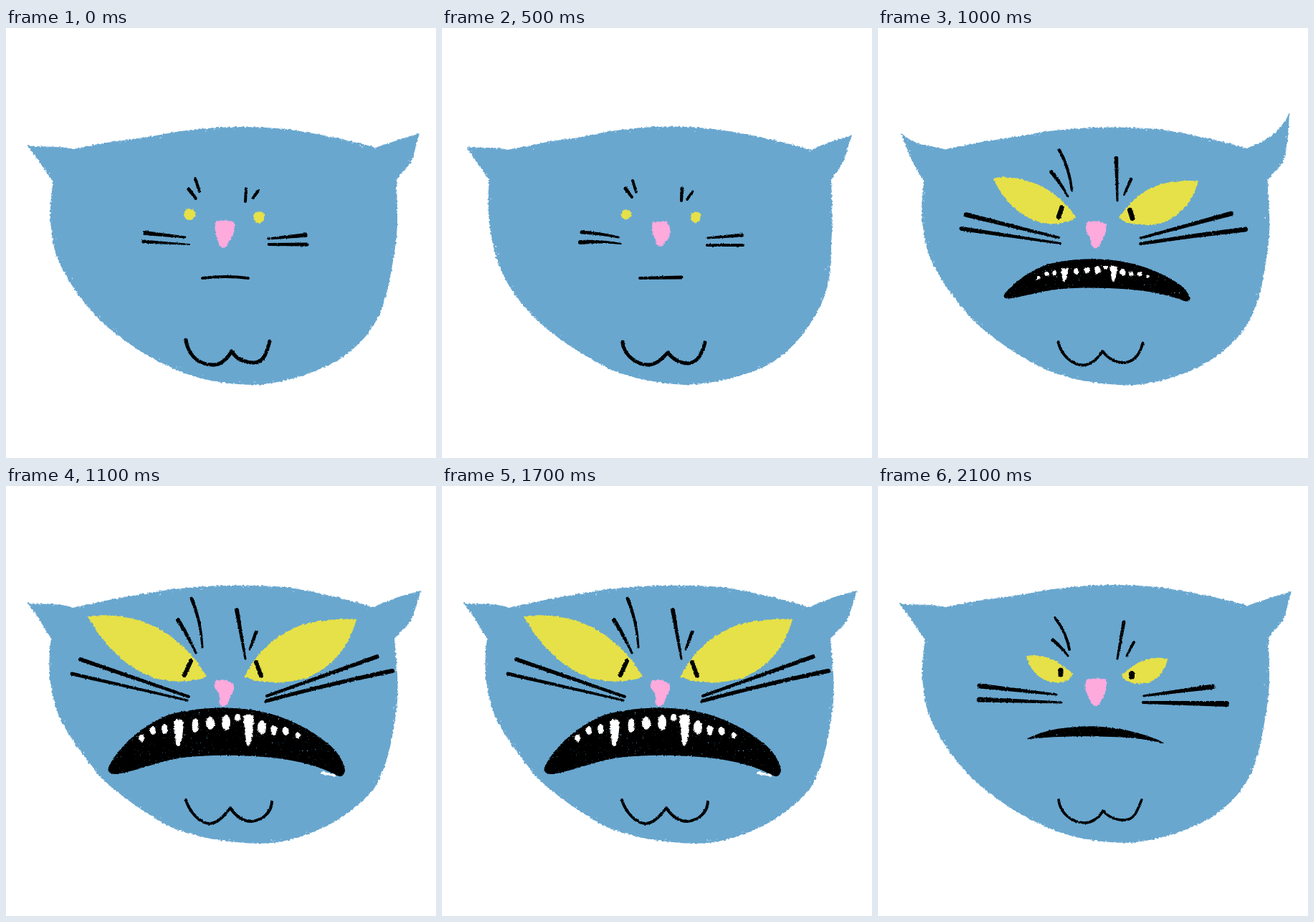
Write an HTML page that moves like this. It is 600 px wide and 600 px high and loops after 2200 ms.

```html
<!DOCTYPE html>
<html lang="en">
<head>
<meta charset="utf-8">
<title>Grumpy cat</title>
<style>
  html, body { margin: 0; width: 100%; height: 100%; overflow: hidden; background: #fff; }
  svg { display: block; width: 100%; height: 100%; }
</style>
</head>
<body>
<svg id="stage" viewBox="0 0 600 600">
  <defs>
    <filter id="chalk" filterUnits="userSpaceOnUse" x="0" y="0" width="600" height="600" color-interpolation-filters="sRGB">
      <feTurbulence type="fractalNoise" baseFrequency=".3" numOctaves="2" seed="4"/>
      <feDisplacementMap in="SourceGraphic" scale="4" xChannelSelector="R" yChannelSelector="G"/>
    </filter>
    <filter id="ink" filterUnits="userSpaceOnUse" x="0" y="0" width="600" height="600" color-interpolation-filters="sRGB">
      <feTurbulence type="fractalNoise" baseFrequency=".45" seed="9" result="noise"/>
      <feColorMatrix in="noise" values="0 0 0 0 0  0 0 0 0 0  0 0 0 0 0  10 0 0 0 -7" result="holes"/>
      <feDisplacementMap in="SourceGraphic" in2="noise" scale="3" xChannelSelector="R" yChannelSelector="G" result="rough"/>
      <feComposite in="rough" in2="holes" operator="out"/>
    </filter>
  </defs>
</svg>
<script>
const BLUE = '#69a7cf', YELLOW = '#e6e148', PINK = '#feaadd';
const STEP = 100, LOOP = 2200;
const stage = document.getElementById('stage');

// Strokes are written as: x1 y1 x2 y2 bend startWidth endWidth
const calmA = {
  head: 'M30 164 C50 167 75 164 95 169 C130 160 160 158 210 150 C270 138 330 135 390 141 C440 148 480 157 516 167 C535 160 555 153 577 147 C571 165 569 185 560 194 C555 201 549 204 545 212 C545 240 548 265 544 300 C539 330 535 365 524 392 C512 425 490 445 463 464 C430 481 395 494 350 498 C310 498 270 491 240 478 C205 463 170 442 140 416 C110 388 82 350 69 314 C60 275 60 250 66 214 C56 202 44 182 30 164Z',
  eyes: '', mouth: '',
  dots: '256 260 256 260 0 16 16,353 264 353 264 0 16 16',
  nose: 'M292 270 C300 268 312 268 318 271 C320 280 319 287 314 294 C311 298 309 302 306 306 C303 308 300 306 298 303 C294 293 290 282 292 270Z',
  lines: '264 210 270 228 0 4 4,255 225 265 238 0 5 4,335 224 334 242 0 4 4,352 227 345 237 0 4 4,194 286 250 292 0 6 3,192 298 256 302 0 5 2,366 294 418 289 0 3 6,367 302 420 302 0 4 5,274 349 338 349 -4 4 4',
  chin: 'M251 435 C253 452 265 470 289 470 C300 470 309 461 315 451 C322 464 337 467 346 467 C360 467 364 452 368 437', pen: '5'
};
const calmB = {
  head: 'M34 166 C55 168 75 165 91 170 C120 165 150 157 190 153 C250 139 310 134 370 140 C430 147 480 160 516 170 C535 160 555 155 572 149 C565 170 562 185 558 190 C552 200 547 204 543 212 C544 240 546 270 543 300 C544 350 537 375 518 406 C500 435 475 463 440 477 C410 488 380 496 340 498 C300 496 260 488 230 474 C190 452 155 430 130 405 C100 375 82 345 73 310 C66 280 62 250 66 212 C55 195 46 185 34 166Z',
  eyes: '', mouth: '',
  dots: '257 260 257 260 0 14 14,354 264 354 264 0 15 15',
  nose: 'M294 271 C300 269 308 272 313 269 C319 276 320 286 317 292 C312 298 309 303 304 305 C298 303 298 298 297 294 C293 285 292 279 294 271Z',
  lines: '266 213 271 229 0 4 4,256 224 265 236 0 5 4,335 224 334 241 0 5 4,350 228 342 239 0 3 4,195 285 246 292 -2 5 3,193 299 250 301 -3 6 2,370 293 419 289 0 3 5,370 303 420 303 0 4 4,276 349 334 348 0 4 5',
  chin: 'M252 438 C252 452 268 470 288 470 C300 470 308 460 315 453 C322 462 333 468 343 468 C358 467 363 453 367 439', pen: '5'
};
const cross = {
  head: calmA.head,
  eyes: 'M207 237 C225 234 245 240 259 252 C264 256 268 259 272 262 C268 272 258 276 245 274 C225 271 212 257 207 237Z M340 264 C352 254 362 244 380 241 C390 239 397 240 404 241 C402 255 393 268 378 274 C362 278 347 276 340 264Z',
  mouth: 'M209 352 C222 346 236 341 250 339 C275 335 300 334 322 337 C345 339 370 346 388 353 C393 355 396 357 399 359 C397 360 394 358 390 357 C370 353 345 350 325 350 C300 349 275 349 255 350 C240 350 225 352 212 353 C209 354 208 353 209 352Z',
  dots: '',
  nose: 'M291 270 C298 268 311 268 318 270 C320 280 318 290 313 297 C309 304 306 308 303 307 C299 306 296 300 294 295 C289 286 288 277 291 270Z',
  lines: '247 184 267 228 -6 4 4,244 215 265 237 -2 5 3,343 190 334 241 0 5 3,357 218 347 237 0 4 3,142 279 249 291 0 7 3,141 298 256 302 0 7 3,370 293 467 280 0 3 7,370 302 486 304 0 4 8,255 257 255 263 0 7 7,354 262 354 266 0 8 8',
  chin: 'M252 438 C254 455 268 469 288 470 C300 470 310 461 314 453 C322 463 335 467 345 466 C360 465 362 450 368 438', pen: '3.6'
};
const fury = {
  head: 'M30 163 C55 166 78 163 93 170 C120 163 160 156 200 149 C260 138 330 137 390 141 C440 149 480 159 513 169 C540 156 560 151 579 146 C573 168 567 185 560 195 C553 202 546 207 542 213 C545 250 549 280 545 310 C540 350 533 390 515 420 C500 440 470 465 440 478 C415 490 385 499 350 499 C300 497 265 490 230 476 C195 457 155 430 128 402 C105 372 80 340 70 310 C60 280 58 245 63 213 C53 198 45 182 30 163Z',
  eyes: 'M114 182 C140 177 180 182 210 197 C240 214 262 235 280 266 C262 274 240 274 215 270 C180 262 140 230 114 182Z M333 266 C350 230 380 205 415 193 C445 186 470 185 489 186 C480 220 460 250 420 268 C390 277 350 275 333 266Z',
  mouth: 'M143 392 C160 360 190 335 225 320 C260 309 310 307 340 312 C380 317 420 335 450 360 C462 370 470 382 473 396 C472 404 468 407 462 404 C440 392 410 383 370 379 C330 375 280 374 240 380 C205 387 180 398 155 402 C145 402 141 399 143 392Z',
  dots: '',
  nose: 'M291 273 C298 268 311 271 317 276 C320 283 317 288 313 294 C311 303 305 309 301 308 C297 304 298 295 297 289 C291 284 290 279 291 273Z',
  lines: '259 157 274 225 -6 5 3,240 187 265 233 -2 6 3,322 173 334 241 0 6 3,349 204 340 228 0 5 3,104 242 255 294 0 6 4,92 262 253 299 0 5 3,364 293 518 238 0 4 6,363 300 539 258 -3 5 6,258 244 249 264 0 6 6,349 246 356 265 0 6 6',
  chin: 'M251 438 C256 455 271 471 284 471 C297 470 304 460 313 449 C319 460 333 469 343 468 C358 466 370 456 371 441', pen: '4',
  teeth: 'scale(1)'
};

function randomFrom(seed) {
  return () => (seed = (seed * 16807) % 2147483647) / 2147483647;
}

function mix(a, b, t) {
  const blend = (from, to) => {
    const ends = to.match(/-?[\d.]+/g);
    let i = 0;
    return from.replace(/-?[\d.]+/g, n => +n + (ends[i++] - n) * t);
  };
  return Object.fromEntries(Object.keys(a).map(k => [k, blend(a[k], b[k])]));
}

// A hand-redrawn variant of a pose
function redraw(pose, seed, amount) {
  const random = randomFrom(seed);
  const wobble = s => s.replace(/-?[\d.]+/g, n => +n + (random() - .5) * amount);
  const out = { ...pose };
  for (const key of ['head', 'eyes', 'nose', 'mouth', 'lines', 'chin']) out[key] = wobble(pose[key]);
  return out;
}

function taper(text) {
  const [x1, y1, x2, y2, bend, w1, w2] = text.split(' ').map(Number);
  const length = Math.hypot(x2 - x1, y2 - y1);
  const nx = length ? (y1 - y2) / length : 0, ny = length ? (x2 - x1) / length : 1;
  const a = w1 / 2, b = w2 / 2, m = (a + b) / 2;
  const cx = (x1 + x2) / 2 + nx * bend, cy = (y1 + y2) / 2 + ny * bend;
  const at = (x, y, r) => `${x + nx * r} ${y + ny * r}`;
  return `M${at(x1, y1, a)} Q${at(cx, cy, m)} ${at(x2, y2, b)} A${b} ${b} 0 0 0 ${at(x2, y2, -b)}` +
    ` Q${at(cx, cy, -m)} ${at(x1, y1, -a)} A${a} ${a} 0 0 0 ${at(x1, y1, a)}Z`;
}
const strokes = list => list ? list.split(',').map(taper).join('') : '';

function add(parent, tag, attrs) {
  const el = document.createElementNS('http://www.w3.org/2000/svg', tag);
  for (const key in attrs) el.setAttribute(key, attrs[key]);
  return parent.appendChild(el);
}

function addTeeth(parent, transform) {
  const g = add(parent, 'g', { fill: '#fff', transform });
  const teeth = '189 352 4 5,205 341 4 6,221 339 4 7,264 334 4.5 10,285 331 6 9,307 330 6 11,323 323 4 6,357 337 6 10,374 341 4.5 7,390 342 4.5 6,407 348 3.5 4';
  for (const tooth of teeth.split(',')) {
    const [cx, cy, rx, ry] = tooth.split(' ');
    add(g, 'ellipse', { cx, cy, rx, ry });
  }
  add(g, 'path', { d: 'M234 328 Q242 323 248 328 Q247 350 243 361 Q239 366 237 359Z M331 321 Q339 316 346 322 Q345 350 340 362 Q336 365 335 356Z' });
}

function addSpecks(parent, head, seed) {
  const random = randomFrom(seed), total = head.getTotalLength();
  let d = '';
  for (let i = 0; i < 80; i++) {
    const p = head.getPointAtLength(random() * total);
    const inset = .004 + random() * random() * .03;
    const x = p.x + (305 - p.x) * inset, y = p.y + (315 - p.y) * inset;
    d += `M${x} ${y}h${.4 + random()}`;
  }
  add(parent, 'path', { d, stroke: '#e4f0f8', 'stroke-width': 1.1 });
}

function draw(pose, index) {
  const g = add(stage, 'g', { display: 'none' });
  const skin = add(g, 'g', { filter: 'url(#chalk)' });
  const head = add(skin, 'path', { d: pose.head, fill: BLUE });
  addSpecks(skin, head, 701 + index * 97);
  add(skin, 'path', { d: pose.eyes + strokes(pose.dots), fill: YELLOW });
  add(skin, 'path', { d: pose.nose, fill: PINK });
  if (pose === fury) add(skin, 'path', { d: 'M440 400 L460 404', stroke: '#fff', 'stroke-width': 3 });
  const ink = add(g, 'g', { filter: 'url(#ink)' });
  add(ink, 'path', { d: pose.mouth + strokes(pose.lines) });
  add(ink, 'path', { d: pose.chin, fill: 'none', stroke: '#000', 'stroke-width': pose.pen, 'stroke-linecap': 'round', 'stroke-linejoin': 'round' });
  if (pose.teeth) addTeeth(add(g, 'g', { filter: 'url(#chalk)' }), pose.teeth);
  return g;
}

const wide = mix(cross, fury, .5);
wide.head = wide.head
  .replace(/^M\S+ \S+/, 'M32 146').replace(/\S+ \S+Z$/, '32 146Z')
  .replace('578 146.5', '574 118');
wide.teeth = 'translate(305 341) scale(.7 .5) translate(-305 -337)';

const poses = [
  calmA, redraw(mix(calmA, calmB, .5), 31, 1.2), calmB,
  cross, wide,
  fury, redraw(fury, 57, 1.6), redraw(fury, 83, 1.6)
].map(draw);

// Three-drawing boil while calm and while furious, quick jumps between
function poseAt(step) {
  if (step < 9) return step % 3;
  if (step === 9 || step === 21) return 3;
  if (step === 10 || step === 20) return 4;
  return 5 + (step - 11) % 3;
}

let shown = -1;
function update() {
  const next = poseAt(Math.floor(performance.now() % LOOP / STEP));
  if (next !== shown) {
    if (shown >= 0) poses[shown].setAttribute('display', 'none');
    poses[next].removeAttribute('display');
    shown = next;
  }
  requestAnimationFrame(update);
}
update();
</script>
</body>
</html>
```
